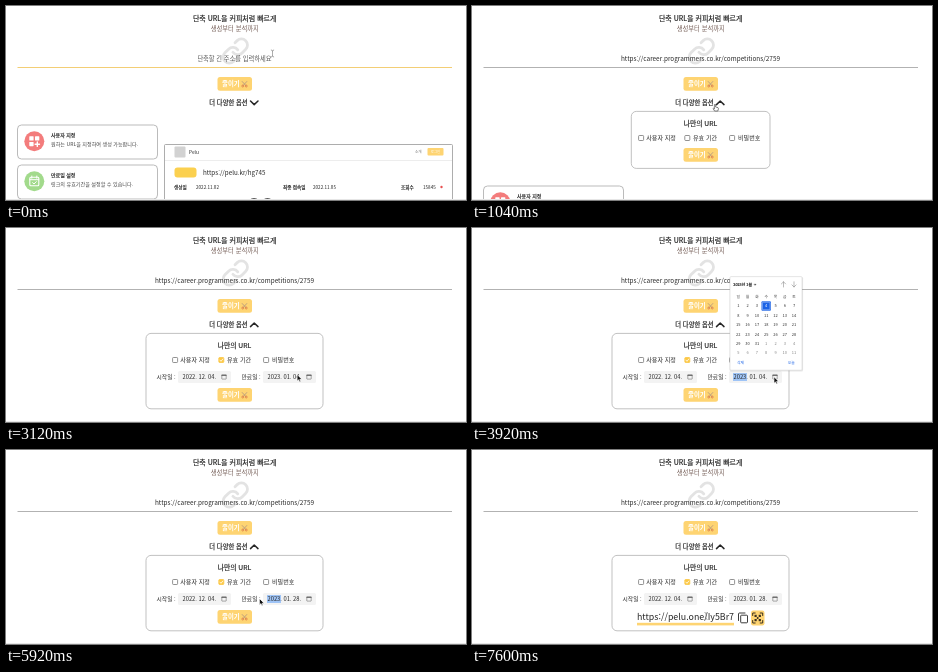
Animation, 460 px wide and 194 px high, one loop 7680 ms. Source, as an HTML page:

```html
<!DOCTYPE html>
<html lang="ko">
<head>
<meta charset="utf-8">
<style>
  html, body { margin: 0; width: 100%; height: 100%; overflow: hidden; background: #fff; }
  svg { display: block; width: 100vw; height: 100vh; }
  text { font-family: 'Noto Sans CJK KR', 'Noto Sans CJK', 'Noto Sans', sans-serif; white-space: pre; }
</style>
</head>
<body>
<svg id="stage" viewBox="0 0 460 194" xmlns="http://www.w3.org/2000/svg"></svg>
<script>
const LOOP = 7680, STEP = 80;
const INK = '#262626', GOLD = '#fed472', GREY = '#b2b2b2', BLUE = '#1a62e6';

// Moments at which the page changes state
const AT = { paste: 320, blur: 960, open: 1040, check: 1920, calendar: 3520,
             pick: 5440, hint: 6080, result: 7040 };

// Pointer: time, x, y
const POINTER = [
  [0, 266.5, 47.5], [560, 266.5, 47.5], [960, 243, 99], [1200, 243, 99], [1760, 216, 132],
  [2560, 216, 132], [3280, 302, 149], [4160, 302, 149], [4800, 324, 122],
  [5120, 320.5, 105], [5440, 320.5, 105], [6160, 230, 164], [7040, 230, 164],
  [7280, 234, 166], [7680, 234, 166]
];

// y is the vertical middle of the line; a hairline stroke gives a medium weight
const text = (s, x, y, size, { fill = INK, weight = 400, anchor = 'start', medium = false } = {}) =>
  `<text x="${x}" y="${y + size * .36}" font-size="${size}" fill="${fill}" font-weight="${weight}" ` +
  `text-anchor="${anchor}"${medium ? ` stroke="${fill}" stroke-width=".2"` : ''}>${s}</text>`;
const centred = (s, x, y, size, opts = {}) => text(s, x, y, size, { ...opts, anchor: 'middle' });
const rect = (x, y, w, h, fill, r = 0, stroke = 'none', line = .8) =>
  `<rect x="${x}" y="${y}" width="${w}" height="${h}" rx="${r}" fill="${fill}" stroke="${stroke}" stroke-width="${line}"/>`;
const path = (d, stroke, line, fill = 'none') =>
  `<path d="${d}" fill="${fill}" stroke="${stroke}" stroke-width="${line}" stroke-linecap="round" stroke-linejoin="round"/>`;
const dot = (x, y, r, fill, stroke = 'none', line = 1) =>
  `<circle cx="${x}" cy="${y}" r="${r}" fill="${fill}" stroke="${stroke}" stroke-width="${line}"/>`;
const move = (x, y, body, scale = 1) => `<g transform="translate(${x} ${y}) scale(${scale})">${body}</g>`;

function pointerAt(t) {
  const i = POINTER.findIndex(p => p[0] > t);
  const [t0, x0, y0] = POINTER[i - 1], [t1, x1, y1] = POINTER[i];
  const k = (t - t0) / (t1 - t0), e = k * k * (3 - 2 * k);
  return [x0 + (x1 - x0) * e, y0 + (y1 - y0) * e];
}

function scissors(x, y) {
  return move(x, y,
    path('M-2.6 -2.8L1.6 1.8M2.6 -2.8L-1.6 1.8', '#b79a80', 1) +
    dot(-2, 2.3, 1.1, 'none', '#dc7a4a', .9) + dot(2, 2.3, 1.1, 'none', '#dc7a4a', .9), .88);
}

function shortenButton(y) {
  return rect(211.5, y, 34.5, 13.8, GOLD, 2.5) +
    text('줄이기', 216, y + 7, 6.4, { fill: '#fff', weight: 700 }) + scissors(238.5, y + 7);
}

function header(t) {
  const url = t >= AT.paste;
  const link = path('M10 13a5 5 0 0 0 7.54.54l3-3a5 5 0 0 0-7.07-7.07l-1.72 1.71' +
    'M14 11a5 5 0 0 0-7.54-.54l-3 3a5 5 0 0 0 7.07 7.07l1.71-1.71', '#e3e3e3', 2.3);
  const chevron = t >= AT.open ? 'M244.5 98.6L248.2 95L252 98.6' : 'M244.5 95L248.2 98.6L252 95';
  return centred('단축 URL을 커피처럼 빠르게', 228.7, 12.3, 7, { medium: true }) +
    centred('생성부터 분석까지', 228.8, 22.8, 6.3, { fill: '#765f58' }) +
    move(214.7, 30.4, link, 1.22) +
    (url ? centred('https://career.programmers.co.kr/competitions/2759', 228.5, 53, 6.42)
         : centred('단축할 긴 주소를 입력하세요', 228.5, 52.8, 6.25, { fill: '#555' })) +
    rect(11.5, 61, 434.5, 1, t >= AT.blur ? GREY : '#f3ce75') +
    shortenButton(71) +
    text('더 다양한 옵션', 203.3, 96.5, 6.3, { medium: true }) + path(chevron, INK, 1.5);
}

function infoCard(y, colour, icon, title, line) {
  return rect(11.5, y, 140, 34, '#fff', 4, '#aaa') + dot(28.3, y + 16.2, 10, colour) +
    move(28.3, y + 16.2, icon) +
    text(title, 45, y + 10, 5, { medium: true }) + text(line, 45, y + 18.7, 5.1, { fill: '#444' });
}

function lowerCards() {
  const grid = [[-5, -5], [.7, -5], [-5, .7]].map(([x, y]) => rect(x, y, 4.3, 4.3, '#fff', .6)).join('') +
    path('M3 .8V5.2M.8 3H5.2', '#fff', 1.4);
  const clock = rect(-4.5, -4, 9, 8.5, 'none', 1, '#fff', 1.1) +
    path('M-4.5 -1.5H4.5M-2.5 -5.2V-3M2.5 -5.2V-3M-1.7 1.5L-.3 2.8L2 .4', '#fff', 1);
  const stat = (s, x, medium = false) => text(s, x, 181, 4.6, { medium });
  return infoCard(119, '#f37c7c', grid, '사용자 지정', '원하는 URL을 지정하여 생성 가능합니다.') +
    infoCard(159, '#a2da8c', clock, '만료일 설정', '링크의 유효기간을 설정할 수 있습니다.') +
    rect(158.5, 138.5, 288, 80, '#fff', 1, '#999') +
    rect(168.5, 140.5, 11, 11, '#d2d2d2', 1) + text('Pelu', 183, 146, 4.8) +
    text('소개', 409, 145.5, 3.6, { fill: '#777' }) + rect(421.5, 142, 16, 7.5, GOLD, 1) +
    centred('로그인', 429.5, 145.7, 3.4, { fill: '#fff' }) +
    rect(159, 154, 287, .6, '#e2e2e2') +
    rect(168.5, 161.5, 22, 10, '#fbd04f', 3) +
    text('https://pelu.kr/hg745', 197, 166.5, 6.25) +
    stat('생성일', 168, true) + stat('2022.11.02', 190) + stat('최종 접속일', 277, true) +
    stat('2022.11.05', 307) + stat('조회수', 395, true) + stat('15845', 417) + dot(435.5, 181, 1.2, '#e85050') +
    dot(248, 198.5, 6.5, '#555') + dot(261.5, 198.5, 6.5, '#555');
}

function checkbox(x, label, labelX, on) {
  return rect(x, 129.5, 5, 5, on ? '#fcc847' : '#fff', .8, on ? '#fcc847' : '#777', .8) +
    (on ? path(`M${x + 1.1} 132.1l1.1 1.2l1.8 -2.3`, '#fff', .8) : '') +
    text(label, labelX, 132, 6.1);
}

function dateField(label, x, value, selected) {
  const icon = move(x + 43.8, 146.7, rect(0, .4, 4.4, 4, 'none', .3, '#555', .5) + path('M0 .5H4.4', '#333', .8));
  return text(label, x - 21.5, 149, 5.8) + rect(x, 143, 53, 12, '#f3f3f3', 1.5) +
    (selected ? rect(x + 4, 145, 14, 8, '#9fc4f6') : '') + text(value, x + 4.5, 149, 5.75) + icon;
}

function resultRow() {
  const corners = [0, 90, 180, 270].map(a =>
    `<g transform="rotate(${a})">${path('M-5 -2.5V-5H-2.5', '#3b3020', 1)}${rect(-3.2, -3.2, 2.2, 2.2, '#3b3020')}</g>`).join('');
  return rect(165, 172.8, 97, 2.6, GOLD) + text('https://pelu.one/Iy5Br7', 165, 167, 8.85) +
    rect(268.7, 165.2, 6.8, 7.6, '#fff', .8, INK, .9) + path('M266.5 170.5V164Q266.5 163 267.5 163H273', INK, .9) +
    rect(279, 160.5, 13.5, 15, GOLD, 2.2) + move(285.7, 168, corners + dot(0, 0, 1, '#3b3020'));
}

function optionsPanel(t) {
  const dated = t >= AT.check;
  let out = dated ? rect(140, 105.4, 177, 75.4, '#fff', 5, GREY) : rect(159.3, 105.4, 138.7, 57, '#fff', 5, GREY);
  out += centred('나만의 URL', 228.5, 117.3, 6.8, { medium: true }) +
    checkbox(166.6, '사용자 지정', 174.2, false) + checkbox(212.8, '유효 기간', 221, dated) +
    checkbox(257.6, '비밀번호', 266, false);
  if (!dated) return out + shortenButton(142);
  out += dateField('시작일 :', 172, '2022. 12. 04.', false) +
    dateField('만료일 :', 257, t >= AT.pick ? '2023. 01. 28.' : '2023. 01. 04.', t >= AT.calendar && t < AT.result);
  out += t >= AT.result ? resultRow() : shortenButton(160);
  if (t >= AT.hint && t < AT.result) {
    const show = Math.min(1, (t - AT.hint + STEP) / 320);
    out += `<g opacity="${show}">` + rect(177, 151, 101, 7.2, '#e0e0e0', 3.6) +
      centred('* 줄이기 기능을 이용하시면 입력한 옵션 URL로 저장됩니다', 227.5, 154.6, 3.7, { fill: '#777' }) + '</g>';
  }
  return out;
}

function calendar(px, py) {
  const colX = c => 266.3 + c * 9.3, rowY = r => 78 + r * 9.4;
  const hoverC = Math.round((px - colX(0)) / 9.3), hoverR = Math.round((py - rowY(0)) / 9.4);
  let out = rect(257.6, 49, 73.5, 94.5, '#00000018', 1.5) + rect(258, 48.6, 72, 93.6, '#fff', 1, '#ccc', .5) +
    text('2023년 1월', 261.3, 56.6, 3.8, { medium: true }) + path('M282.3 56.2h1.8l-.9 1z', INK, .3, INK) +
    path('M311.5 59V53.8M309.4 55.9L311.5 53.8L313.6 55.9M322 53.8V59M319.9 56.9L322 59L324.1 56.9', '#777', .5);
  [...'일월화수목금토'].forEach((d, c) => out += centred(d, colX(c), 68.3, 3.8, { fill: '#444' }));
  for (let i = 0; i < 42; i++) {
    const c = i % 7, r = Math.floor(i / 7), x = colX(c), y = rowY(r), chosen = i === 3;
    if (chosen) out += rect(x - 4.7, y - 4.7, 9.4, 9.4, BLUE, 1) + rect(x - 3.8, y - 3.8, 7.6, 7.6, 'none', .5, '#fff', .4);
    else if (c === hoverC && r === hoverR) out += rect(x - 4.7, y - 4.7, 9.4, 9.4, '#b3cff5', 1);
    out += centred(i % 31 + 1, x, y, 4, { fill: chosen ? '#fff' : i > 30 ? '#888' : '#333' });
  }
  return out + centred('삭제', 268.5, 135, 3.8, { fill: BLUE }) + centred('오늘', 319.3, 135, 3.8, { fill: BLUE });
}

function pointer(t, x, y) {
  const beam = path('M-1.2 -3.5Q0 -3.5 0 -2.5V2.5Q0 3.5 -1.2 3.5M1.2 -3.5Q0 -3.5 0 -2.5M0 2.5Q0 3.5 1.2 3.5', '#777', .6);
  const arrow = path('M0 0V6.2L1.5 4.9L2.5 7.1L3.5 6.6L2.6 4.5H4.5Z', '#fff', .6, '#111');
  const hand = path('M-.6 3V-.4Q0 -1.2 .6 -.4V2L3 2.6Q3.6 3 3.4 4L2.8 6H-.4L-2 3.6Q-1.8 2.8 -.6 3.6Z', '#333', .6, '#fff');
  const overText = t < 640 || t >= AT.result;
  const overButton = t >= 880 && t < 1280 || t >= AT.hint;
  return move(x, y, overText ? beam : overButton ? hand : arrow);
}

const stage = document.getElementById('stage');
let shown = -1;

function draw(t) {
  const [x, y] = pointerAt(t);
  const push = t >= AT.check ? 81 : t >= AT.open ? 61 : 0;
  stage.innerHTML = rect(0, 0, 460, 194, '#fff') + header(t) + move(0, push, lowerCards()) +
    (t >= AT.open ? optionsPanel(t) : '') +
    (t >= AT.calendar && t < AT.pick ? calendar(x, y) : '') +
    rect(0, 193, 460, 1, '#e6e6e6') + pointer(t, x, y);
}

const start = performance.now();
function tick() {
  const t = Math.floor(((performance.now() - start) % LOOP) / STEP) * STEP;
  if (t !== shown) draw(shown = t);
  requestAnimationFrame(tick);
}
tick();
</script>
</body>
</html>
```
